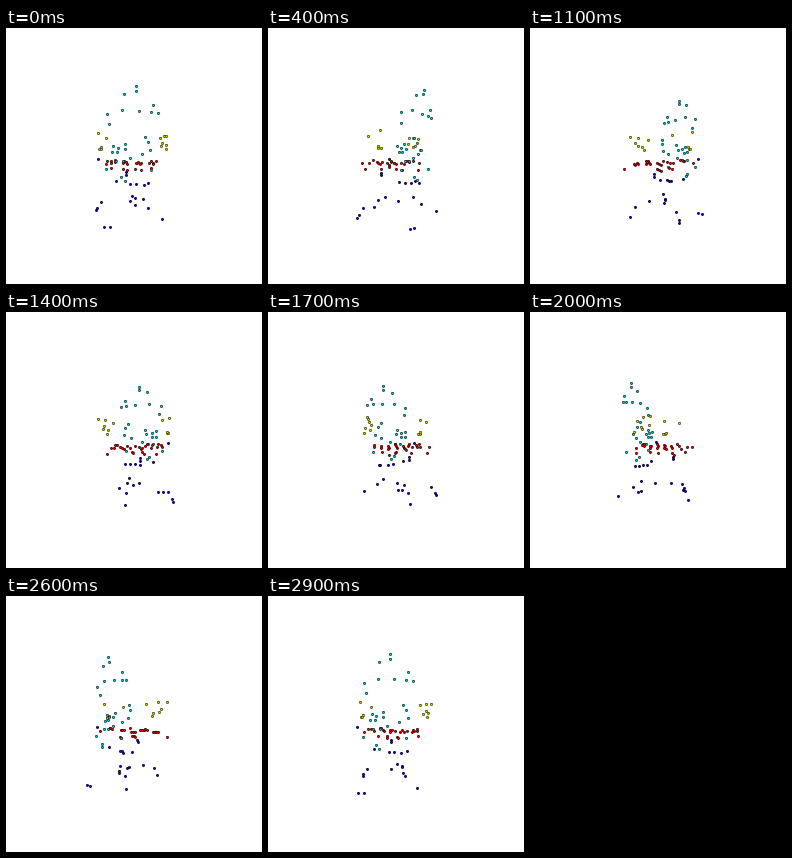
These frames come from a looping animation (256x256 px, 3000 ms). An HTML page with a canvas:

```html
<!DOCTYPE html>
<html lang="en">
<head>
<meta charset="utf-8">
<title>Turning chair of points</title>
<style>
html, body { margin: 0; width: 100%; height: 100%; overflow: hidden; background: #fff; }
canvas { display: block; width: 100vw; height: 100vh; }
</style>
</head>
<body>
<canvas id="stage" width="256" height="256"></canvas>
<script>
const ctx = document.getElementById("stage").getContext("2d");
const LOOP = 3000, STEP = 100;
const CENTER_X = 128, CENTER_Y = 128.5, CAMERA = 238;

// Depth of the curved backrest at a given height
const backDepth = y => y < -20 ? 20 - 0.21 * y : 23 + 0.45 * y;
const fract = v => v - Math.floor(v);

// x, y
const back = [
  [1.5, -61], [1.5, -57], [-8.7, -54.5], [16.7, -45], [-10.5, -41], [-24, -37.5],
  [4.5, -40], [15, -39], [21, -38], [-22, -29], [10, -18], [13, -13.6],
  [15, -6], [7.5, -2.5], [-8.5, -11.7], [-19.5, -9.7], [-15, -7.8], [-20, -4],
  [-15.5, -4], [-8.5, -7], [-3.5, 1.5], [-16, 4], [-10, 4], [-25, 11],
  [-11, 18], [-8, 21], [15, 12]
].map(([x, y]) => [x, y, backDepth(y)]);

// x, y, z
const arms = [
  [-34, -22.5, 12], [-29, -19, -9.5], [-32, -9, 7.8], [-33.5, -7.2, 9.5], [-31.5, -7.2, 11],
  [33.5, -21, -11], [30, -20.5, -2], [25, -18, 8.4], [29, -14, -7.5],
  [32, -11.5, -1], [27, -10.5, 0.6], [31, -7.3, 6.7]
];

const base = [
  [-25.3, 59, 38.2], [-20, 59, 38], [24.5, 54, 31], [-39.5, 56, -12], [-38.5, 53.5, -11],
  [-34.5, 47.5, -10.4], [12.7, 46.7, 22], [1, 55.5, -33], [1, 46.5, -27.5], [-4, 43.5, 6],
  [8.5, 40, 14.5], [-2, 42, -14], [-32.7, 2.3, 22], [-8.4, 16.3, -12.5], [-8.4, 19, -13],
  [-16.6, 22.5, 19], [-3.7, 25.5, 15], [2, 25.5, 17], [9, 25.8, 22], [13, 25, 14]
];

// Even scatter over a flat cushion, with a few points on its underside
const seat = Array.from({ length: 27 }, (_, i) => [
  -27 + 56 * fract(0.5 + i * 0.7549),
  i % 5 === 0 ? 12.5 : 3.5 + 4.5 * fract(i * 0.618),
  -30 + 58 * fract(0.5 + i * 0.5698)
]);

const points = [
  [base, "#1c00d8"], [back, "#00cccc"], [arms, "#d6d600"], [seat, "#e60000"]
].flatMap(([part, color]) => part.map(([x, y, z]) => ({ x, y, z, color })));

function project(p, angle) {
  const c = Math.cos(angle), s = Math.sin(angle);
  const depth = p.z * c - p.x * s;
  const scale = CAMERA / (CAMERA - depth);
  return {
    x: Math.round(CENTER_X + (p.x * c + p.z * s) * scale) + 0.5,
    y: Math.round(CENTER_Y + p.y * scale) + 0.5,
    depth,
    color: p.color
  };
}

function disc(x, y, r, color) {
  ctx.fillStyle = color;
  ctx.beginPath();
  ctx.arc(x, y, r, 0, Math.PI * 2);
  ctx.fill();
}

function draw(time) {
  const angle = Math.floor((time % LOOP) / STEP) * STEP / LOOP * Math.PI * 2;
  ctx.fillStyle = "#fff";
  ctx.fillRect(0, 0, 256, 256);
  points.map(p => project(p, angle))
    .sort((a, b) => a.depth - b.depth)
    .forEach(d => {
      disc(d.x, d.y, 1.45, "#000");
      disc(d.x, d.y, 1.05, d.color);
    });
}

const start = performance.now();
function tick() {
  draw(performance.now() - start);
  requestAnimationFrame(tick);
}
tick();
</script>
</body>
</html>
```
